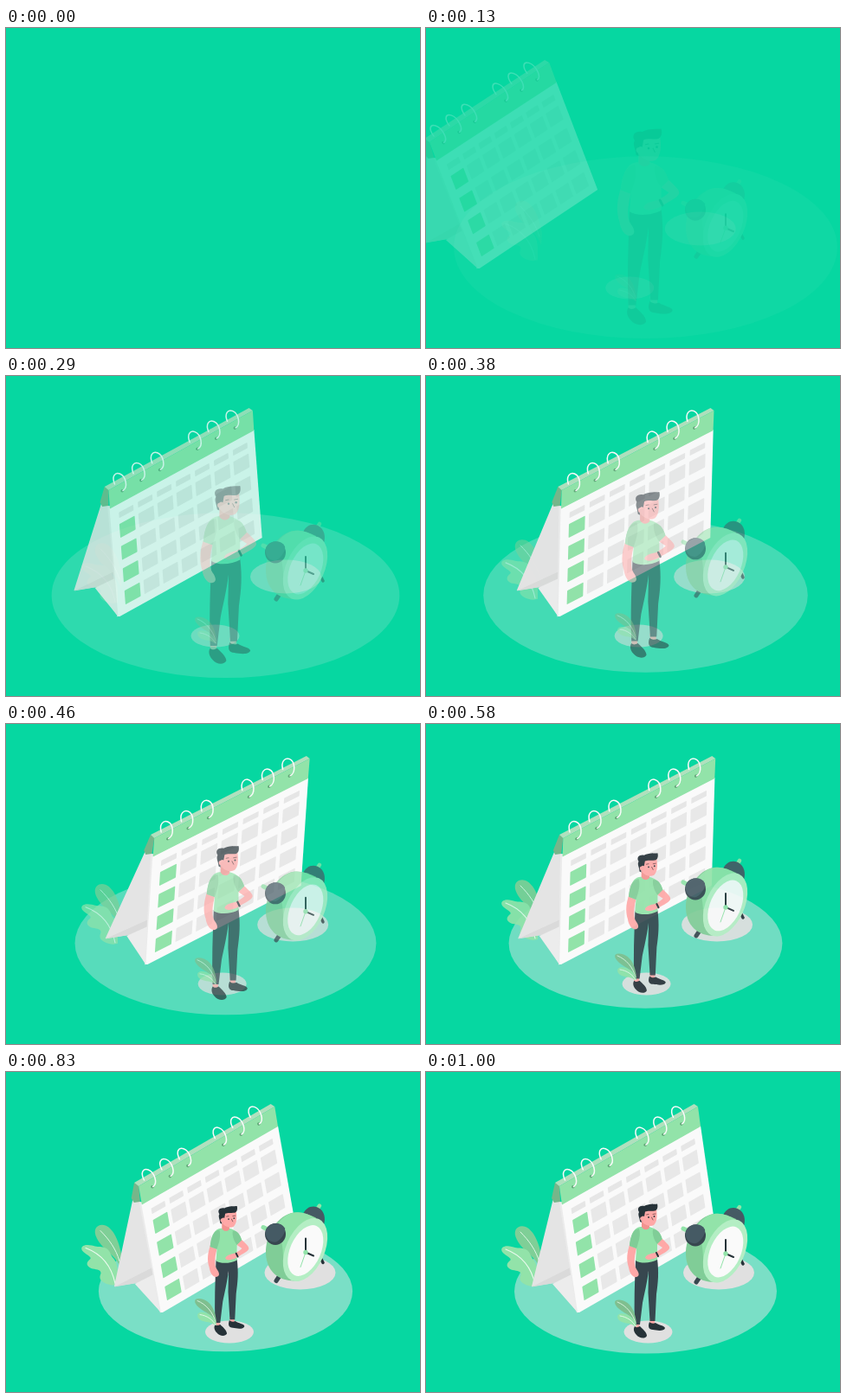
These frames come from a looping animation (478x370 px, 1040 ms). An HTML page:

```html
<!DOCTYPE html>
<html lang="en">
<head>
<meta charset="utf-8">
<title>Calendar and alarm clock</title>
<style>
html, body { margin: 0; width: 100%; height: 100%; overflow: hidden; background: #06d7a1; }
svg { display: block; width: 478px; height: 370px; }
.line { fill: none; stroke-linecap: round; stroke-linejoin: round; }
</style>
</head>
<body>
<svg viewBox="0 0 478 370">
  <g id="floor"><ellipse cx="253.5" cy="253.6" rx="151.5" ry="72" fill="#7adfc6"/></g>

  <g id="plant">
    <path d="M133 230C127 212 112 208 105 194C99 183 106 176 115 179C126 184 131 200 134 216Z" fill="#7fcf97"/>
    <path class="line" d="M109 185C119 195 127 206 131 220" stroke="#dff7e5" stroke-width="1"/>
    <path d="M124 248C115 247 106 243 109 236C111 231 107 230 100 229C91 226 93 221 97 218C100 215 92 213 88 208C85 203 91 200 99 202C105 204 107 203 112 204C121 206 120 213 124 217C130 223 129 237 129 247Z" fill="#92e3a9"/>
    <path class="line" d="M92 205C108 211 121 222 126 246" stroke="#eafaee" stroke-width="1.1"/>
  </g>

  <g id="shadows" fill="#e0e0e0">
    <ellipse cx="338" cy="232" rx="41" ry="19.5"/>
    <ellipse cx="256.5" cy="300.5" rx="28" ry="13"/>
  </g>

  <g id="calendar">
    <path d="M147 146L122 248L148 244L175 278L157 151Z" fill="#e4e4e4"/>
    <path d="M122 248.5L167 226L175 278L148 244Z" fill="#dadada"/>
    <path d="M146 245L168 234L175 278Z" fill="#ececec"/>
    <path d="M154 151L157 150L178 276L174 278.5Z" fill="#ebebeb"/>
    <path d="M156.5 153L317 62L335 187L177 278L175 278Z" fill="#fafafa"/>
    <path d="M149 128L145 146L148 151L155 150L154 131Z" fill="#76b68a"/>
    <path d="M149 128L309.5 37L314 40L154 132Z" fill="#b0e0bd"/>
    <path d="M154 132L314 40L317 63L157 153.5Z" fill="#92e3a9"/>
    <g id="cells"></g>
    <g id="rings"></g>
  </g>

  <g id="clock">
    <path d="M364 218L366 222" class="line" stroke="#263238" stroke-width="3.5"/>
    <path d="M318 234L312 243" class="line" stroke="#37474f" stroke-width="5"/>
    <path d="M358 162L362 156" class="line" stroke="#92e3a9" stroke-width="4.5"/>
    <path d="M343 166C346 157 356 154 363 160C369 165 369 174 366 181C360 172 352 168 343 166Z" fill="#455a64"/>
    <path d="M343 166C352 166 362 171 366 181C358 180 350 174 343 166Z" fill="#263238"/>
    <path d="M300 207C301 188 314 167 332 164C341 163 349 166 358 170L333 243C315 243 299 232 300 207Z" fill="#80cd97"/>
    <path d="M313 178C320 168 328 164 334 164C342 163 350 166 358 171C338 176 322 198 320 228C321 208 318 192 313 178Z" fill="#92e3a9"/>
    <ellipse cx="345.5" cy="207" rx="22.2" ry="38.8" transform="rotate(24 345.5 207)" fill="#b4eec4"/>
    <ellipse cx="345.8" cy="208" rx="17.7" ry="31.2" transform="rotate(24 345.8 208)" fill="#fafafa"/>
    <path d="M297 181L303 184" class="line" stroke="#92e3a9" stroke-width="5"/>
    <ellipse cx="311" cy="189" rx="12" ry="12.5" fill="#37474f"/>
    <path d="M301 182C306 175 317 174 322 182C323 187 318 195 312 198C303 200 297 190 301 182Z" fill="#455a64"/>
    <path class="line" d="M346 210V194M346 210L355 214" stroke="#263238" stroke-width="2"/>
    <path class="line" d="M346 210L340 227" stroke="#92e3a9" stroke-width="1"/>
    <circle cx="346" cy="210" r="2.7" fill="#92e3a9"/>
  </g>

  <g id="man">
    <path d="M241 288H246L247 297H241ZM258 285H264L264 293H259Z" fill="#ffa8a7"/>
    <path d="M241 294C243 296 245 295 247 294C250 297 255 301 255 305C253 309 246 308 243 304C240 301 239 297 241 294Z" fill="#263238"/>
    <path d="M258 289C260 291 263 291 265 290C269 293 275 293 276 296C275 300 267 299 262 298C257 298 256 294 258 289Z" fill="#263238"/>
    <path d="M242 217L267 216C269 232 268 243 266 257L264.5 288H258.5L256.5 255L257 230C255 245 252 257 250 267L247 292H241C240 268 241 243 242 217Z" fill="#37474f"/>
    <path d="M236 197C232 208 231 217 234 226C235 233 239 238 243 237C247 236 246 232 243 228C239 222 241 211 244 200Z" fill="#ffa8a7"/>
    <path d="M249 179C242 179 237 184 235 201L243 204L242 218C248 222 260 221 267 217L267 199L273 194C271 186 266 181 258 179Z" fill="#92e3a9"/>
    <path d="M246 181C239 182 236 189 235 201L243 204C246 195 248 188 246 181Z" fill="#80cd97"/>
    <path d="M262 182C269 182 271 188 273 194L267 199C263 194 261 187 262 182Z" fill="#80cd97"/>
    <path d="M267 199L273 193C278 198 282 201 281 204C279 208 271 211 265 215C260 217 255 218 253 215C254 211 260 210 264 209C268 207 271 205 273 203Z" fill="#ffa8a7"/>
    <path d="M266 209L268 213" class="line" stroke="#263238" stroke-width="2"/>
    <path d="M249 168L258 173L258 180C255 184 250 182 249 179Z" fill="#f2938f"/>
    <path d="M248 161C253 158 260 157 266 159C267 166 267 173 263 177C258 180 249 176 248 169Z" fill="#ffa8a7"/>
    <path d="M247 173C247 169 244 165 246 162C243 157 247 154 252 155C257 152 264 153 267 152.5C268 156 267 160 264 160.5C259 161 256 160 253 161.5L252 167C249 165 248 169 249 174Z" fill="#263238"/>
    <circle cx="249.5" cy="169.5" r="2.3" fill="#ffa8a7"/>
    <g fill="#263238"><circle cx="257" cy="168" r=".9"/><circle cx="263.5" cy="167" r=".9"/></g>
    <path class="line" d="M260.5 168L262 171M254.5 165L257 164.5M262 164.5L265 164" stroke="#5b3b3d" stroke-width=".7"/>
  </g>

  <g id="sprout">
    <path d="M241 291C239 281 231 281 223 274C216 268 217 263 223 263.5C235 264 242 276 243 291Z" fill="#7fbf8f"/>
    <path class="line" d="M221 266C231 270 239 279 242 291" stroke="#dff7e5" stroke-width=".9"/>
    <path d="M241 294C236 289 226 292 222 286C219 280 224 278 231 280C238 283 242 288 243 294Z" fill="#92e3a9"/>
    <path class="line" d="M224 282C232 283 239 288 242 294" stroke="#eafaee" stroke-width=".9"/>
  </g>
</svg>
<script>
const LOOP = 1040, STEP = 1000 / 24, SLIDE = 23;
const el = id => document.getElementById(id);

function buildCalendar() {
  let cells = '';
  const cell = (x, y, w, h, fill) => {
    cells += `<rect x="${-w / 2}" y="${-h / 2}" width="${w}" height="${h}" rx=".8" fill="${fill}" transform="matrix(1 -.567 .145 1 ${x} ${y})"/>`;
  };
  for (let col = 0; col < 7; col++) {
    const dx = col * 21.1, dy = col * -12;
    cell(176 + dx, 156.5 + dy, 16, 6.5, '#e6e6e6');
    for (let row = 0; row < 4; row++) {
      cell(178.7 + dx + row * 3.75, 174.3 + dy + row * 25.7, 17, 16, col ? '#e8e8e8' : '#92e3a9');
    }
  }
  el('cells').innerHTML = cells;

  el('rings').innerHTML = [0, 1, 2, 4, 5, 6].map(i =>
    `<g transform="translate(${i * 20.85} ${i * -12.1})">
      <circle cx="169.8" cy="132.7" r="1.8" fill="#62a878"/>
      <path class="line" d="M160.5 125C156 116 160 111 165.5 113C173 116 176.5 129 170.5 132.5" stroke="#fafafa" stroke-width="1.5"/>
    </g>`).join('');
}

// Cubic Bezier easing (.36, -.01, .5, 1.38), solved by bisection.
function ease(x) {
  if (x <= 0) return 0;
  if (x >= 1) return 1;
  const curve = (s, a, b) => 3 * (1 - s) ** 2 * s * a + 3 * (1 - s) * s * s * b + s ** 3;
  let low = 0, high = 1;
  for (let i = 0; i < 30; i++) {
    const mid = (low + high) / 2;
    if (curve(mid, .36, .5) < x) low = mid; else high = mid;
  }
  return curve(low, -.01, 1.38);
}

function place(id, opacity, transform) {
  el(id).setAttribute('opacity', Math.max(0, Math.min(1, opacity)));
  el(id).setAttribute('transform', transform);
}

const zoom = (scale, x, y) => `translate(${x} ${y}) scale(${scale}) translate(${-x} ${-y})`;

// Skews past upright, then settles; each segment is eased on its own.
function calendarSkew(x) {
  if (x < .59) return 20 - 30 * ease(x / .59);
  if (x < .8) return -10 + 12.5 * ease((x - .59) / .21);
  return 2.5 - 2.5 * ease((x - .8) / .2);
}

function render(time) {
  const step = Math.floor((time % LOOP + 4) / STEP);
  const x = (step + .5) / 24;
  const shown = step >= 2 ? 1 : 0;
  const p = ease(x), rest = 1 - p, enter = ease(x / .59);
  const scale = 1 + .5 * rest;
  const rise = `translate(0 ${SLIDE * rest})`;

  place('floor', shown * p, zoom(scale, 253.5, 253.5));
  place('man', shown * p, zoom(scale, 257, 230.5));
  place('shadows', shown * p, `translate(${-SLIDE * rest} 0)`);
  for (const id of ['plant', 'clock', 'sprout']) place(id, shown * p, rise);
  place('calendar', shown * enter,
    `translate(${-185 * (1 - enter)} 157) skewX(${calendarSkew(x)}) translate(0 -157)`);
}

buildCalendar();
const start = performance.now();
function tick() {
  render(performance.now() - start);
  requestAnimationFrame(tick);
}
tick();
</script>
</body>
</html>
```
